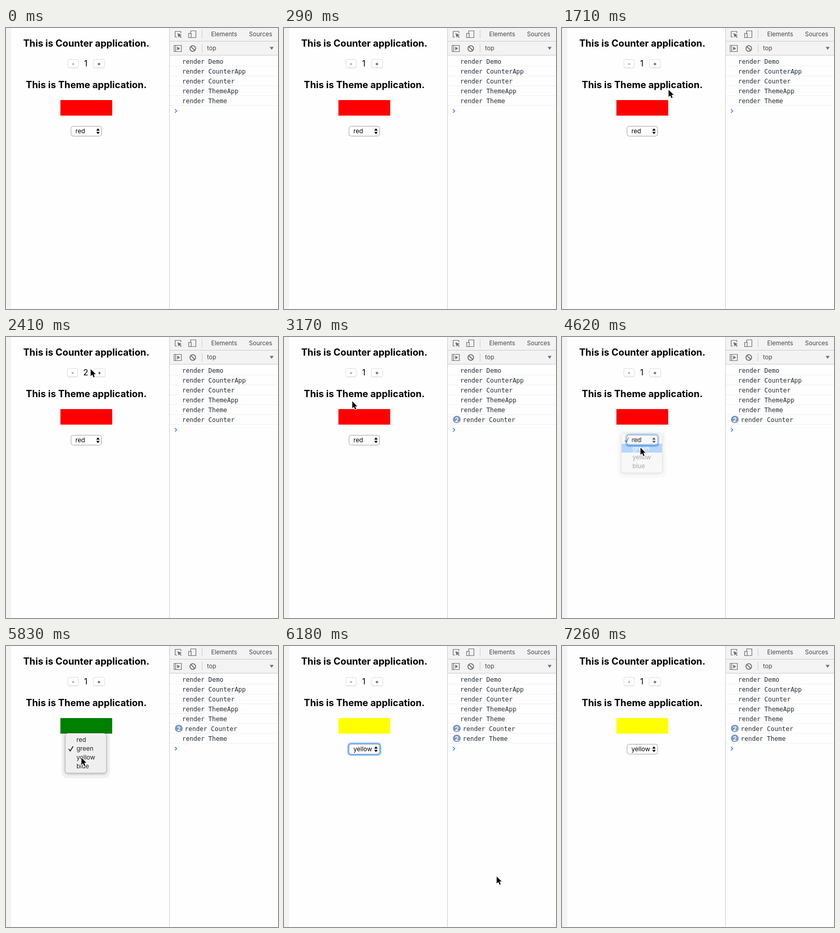
An HTML page that plays this animation: 525 by 542 pixels, repeating every 7.36 s.

```html
<!DOCTYPE html>
<html lang="en">
<head>
<meta charset="utf-8">
<title>Counter and Theme</title>
<style>
  html, body { margin: 0; width: 100%; height: 100%; overflow: hidden; background: #fefefe; }
  svg { display: block; width: 525px; height: 542px; font-family: Inter, sans-serif; }
  text { white-space: pre; }
  .heading { font-size: 18.2px; font-weight: 700; text-anchor: middle; }
  .count { font-size: 16px; text-anchor: middle; }
  .label { font-size: 11px; text-anchor: middle; }
  .option { font-size: 12px; }
  .tool { font-size: 11.6px; fill: #464646; }
  .log { font: 12px "DejaVu Sans Mono", monospace; fill: #222b35; }
  .badge { font-size: 12px; font-weight: 700; fill: #fff; text-anchor: middle; }
  .icon { fill: none; stroke: #6e6e6e; stroke-width: 1.2; }
  .solid { fill: #6e6e6e; stroke: none; }
  .panel { fill: #efefef; stroke: #c2c2c2; filter: drop-shadow(0 1px 2px rgba(0, 0, 0, .3)); }
</style>
</head>
<body>
<svg viewBox="0 0 525 542">
  <rect width="525" height="542" fill="#fefefe"/>
  <rect width="10" height="542" fill="#f3f3f3"/>
  <text class="heading" x="155" y="36">This is Counter application.</text>
  <text class="heading" x="155" y="116">This is Theme application.</text>

  <rect x="316" width="209" height="52" fill="#f3f3f3"/>
  <path d="M315.5 0V542M316 25.5H525M316 52.5H525M378.5 4V20M378.5 31V47" stroke="#ccc" fill="none"/>
  <g class="icon">
    <path d="M330 17.5H326.5V6.5H337.5V10"/>
    <path class="solid" d="M331 10L339.5 13.5L336 14.6L339 18L337.6 19L334.8 15.8L333 18.5Z"/>
    <path d="M356.5 10V5.5H366.5V18.5H358"/>
    <rect x="352.5" y="10.5" width="5" height="8"/>
    <path d="M324.5 33.5H338.5V45.5H324.5ZM327.5 33.5V45.5"/>
    <path class="solid" d="M330.5 36V43L336 39.5Z"/>
    <circle cx="360.5" cy="39.5" r="5.4" stroke-width="1.8"/>
    <path d="M356.7 35.7L364.3 43.3" stroke-width="1.8"/>
    <path class="solid" d="M509 36.5H516.5L512.75 42Z"/>
  </g>
  <text class="tool" x="396" y="16">Elements</text>
  <text class="tool" x="469" y="16">Sources</text>
  <text class="tool" x="388" y="43">top</text>

  <g id="live"></g>
</svg>
<script>
const LOOP = 7360;
const COLORS = ['red', 'green', 'yellow', 'blue'];
const ROW = 17;                                   // height of a menu option
const LINE = 19;                                  // height of a console line

const PLUS = 2290, MINUS = 3050, BLUR = 7260;     // clicks
const MENUS = [{ open: 3620, pick: 4390 }, { open: 5190, pick: 5830 }];
const BLINK = 60, FADE_DELAY = 120, FADE = 180, APPLY = 290;

// Where the pointer heads, and when it sets off
const MOVES = [
  { at: 1250, to: [226, 217], duration: 230 },
  { at: 1612, to: [173, 61] },                    // plus button
  { at: 2360, to: [126, 62] },                    // minus button
  { at: 3110, to: [147, 201] },                   // select
  { at: 3920, to: [151, 213] },                   // green
  { at: 4690, to: [148, 197] },                   // select
  { at: 5370, to: [145, 215] },                   // yellow
  { at: 6060, to: [410, 444], duration: 120 },
  { at: 6420, to: [473, 560] },
];

const live = document.getElementById('live');
const clamp = u => Math.min(1, Math.max(0, u));
const easeOut = (u, power) => 1 - (1 - u) ** power;

function pointerAt(t) {
  let x = 404, y = 560;
  for (const { at, to, duration = 450 } of MOVES) {
    const u = clamp((t - at) / duration);
    x += (to[0] - x) * easeOut(u, 2);
    y += (to[1] - y) * easeOut(u, 4);
  }
  return [x, y];
}

const text = (kind, x, y, content, extra = '') =>
  `<text class="${kind}" x="${x}" y="${y}" ${extra}>${content}</text>`;

const button = (x, width, label) =>
  `<rect x="${x + .5}" y="61" width="${width}" height="16.5" rx="3" fill="#bbb" opacity=".5"/>
   <rect x="${x + .5}" y="60.5" width="${width}" height="16" rx="3" fill="#fff" stroke="#dcdcdc"/>` +
  text('label', x + .5 + width / 2, 73, label);

function counter(count) {
  const shift = count - 1;
  return button(119 - shift, 20, '-') + button(168 + shift, 22, '+') + text('count', 154, 73.5, count);
}

function select(theme, focused) {
  const ring = focused
    ? `<rect x="124" y="188" width="62" height="22" rx="5" fill="none" stroke="#a9d0ff" stroke-width="4"/>
       <rect x="124.5" y="188.5" width="61" height="21" rx="5" fill="none" stroke="#68acfa" stroke-width="2"/>` : '';
  return `<rect x="105" y="139" width="100" height="30" fill="${COLORS[theme]}"/>${ring}
    <rect x="125.5" y="189.5" width="59" height="19" rx="4" fill="#fff" stroke="#a3a3a3"/>
    <path d="M174.2 198L177.5 193.5L180.8 198ZM174.2 200.3L177.5 204.8L180.8 200.3Z"/>` +
    text('option', 134, 203, COLORS[theme]);
}

function consoleLog(lines) {
  const rows = lines.map(([name, repeats], i) => {
    const y = 69 + LINE * i, repeated = repeats > 1;
    const badge = `<rect x="326" y="${y - 12}" width="15" height="14" rx="7" fill="#7e97bd"/>` +
      text('badge', 333.5, y - .5, repeats);
    return `<path d="M316 ${y + 4.5}H525" stroke="#f0f0f0"/>` + (repeated ? badge : '') +
      text('log', repeated ? 345 : 340, y, 'render ' + name);
  });
  return rows.join('') +
    `<path d="M326 ${61.5 + LINE * lines.length}l3.5 3.5l-3.5 3.5" fill="none" stroke="#3f83f2" stroke-width="1.7"/>`;
}

// The menu opens with its checked option over the select.
function menu(theme, sincePick, pointerY) {
  const top = 185 - ROW * theme, first = top + 4;
  const blink = sincePick >= 0 && sincePick < BLINK;
  const hovered = blink ? -1 : Math.floor((pointerY - first) / ROW);
  const items = COLORS.map((name, i) => {
    const y = first + ROW * i, on = i === hovered, ink = on ? '#fff' : '#222';
    return (on ? `<rect x="115" y="${y}" width="78" height="${ROW}" fill="#4a98fc"/>` : '') +
      (i === theme ? `<path d="M121 ${y + 9.5}l3 4l5.5 -9" fill="none" stroke="${ink}" stroke-width="1.8"/>` : '') +
      text('option', 136, y + 13, name, `fill="${ink}"`);
  });
  return `<g opacity="${clamp(1 - (sincePick - FADE_DELAY) / FADE)}">
    <rect x="107" y="${top - 4}" width="94" height="91" rx="11" opacity=".05"/>
    <rect class="panel" x="114.5" y="${top + .5}" width="79" height="76.5" rx="5"/>
    ${items.join('')}</g>`;
}

const pointer = (x, y) =>
  `<path transform="translate(${x} ${y})" d="M.5 .5V14.2L3.7 11.2L6 16.4L8.2 15.4L6 10.3H10.2Z"
    stroke="#fff" stroke-width="2" stroke-linejoin="round" paint-order="stroke"/>`;

function scene(t) {
  const [x, y] = pointerAt(t);
  const theme = MENUS.filter(({ pick }) => t >= pick + APPLY).length;
  const clicks = (t >= PLUS) + (t >= MINUS);

  const lines = ['Demo', 'CounterApp', 'Counter', 'ThemeApp', 'Theme'].map(name => [name, 1]);
  if (clicks) lines.push(['Counter', clicks]);
  if (theme) lines.push(['Theme', theme]);

  const current = MENUS[theme];
  const popup = current && t >= current.open ? menu(theme, t - current.pick, y) : '';
  const focused = t >= MENUS[0].open && t < BLUR;
  return counter(clicks === 1 ? 2 : 1) + select(theme, focused) + consoleLog(lines) + popup + pointer(x, y);
}

function draw(now) {
  live.innerHTML = scene(now % LOOP);
  requestAnimationFrame(draw);
}
draw(0);
</script>
</body>
</html>
```
